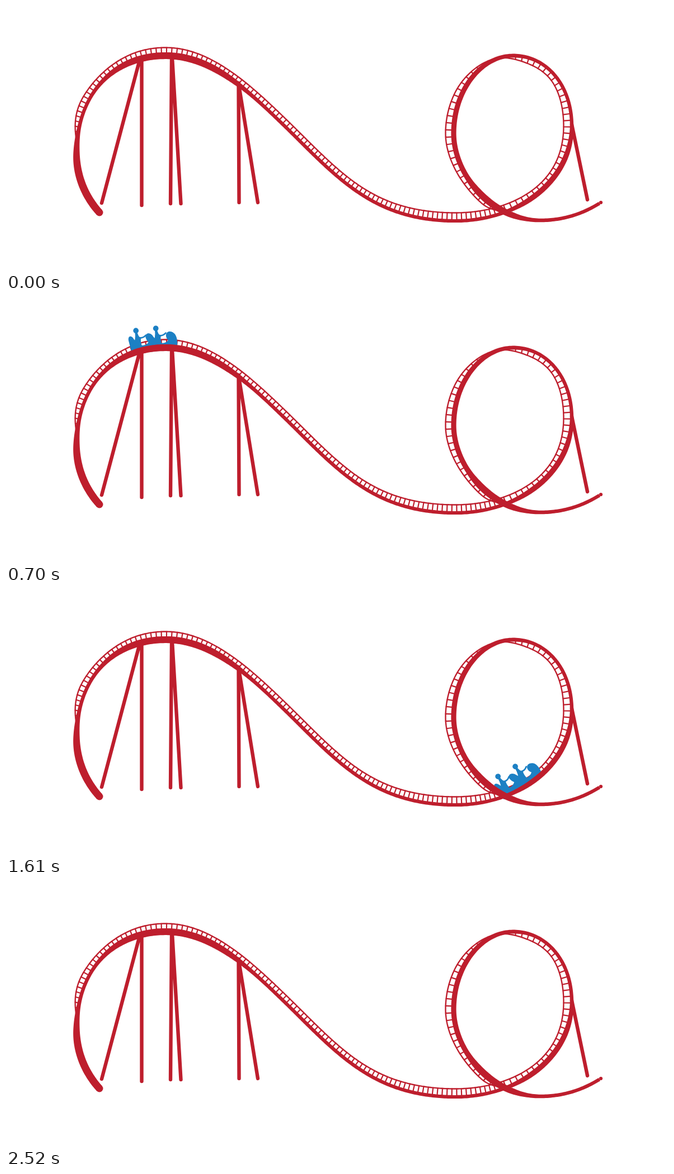
Recreate the animation shown at these times as an HTML page. Size 1183 px wide and 473 px high, loop 2550 ms.

```html
<!DOCTYPE html>
<html lang="en">
<head>
<meta charset="utf-8">
<title>Roller coaster</title>
<style>
html, body { margin: 0; width: 100%; height: 100%; overflow: hidden; background: #fff; }
svg { display: block; width: 1183px; height: 473px; }
.line { fill: none; stroke: #be1e2d; stroke-linecap: round; }
.rail { fill: #be1e2d; }
#cart { fill: #1c80c4; }
.arm { fill: none; stroke: #1c80c4; stroke-width: 2.6; stroke-linecap: round; }
</style>
</head>
<body>
<svg viewBox="0 0 1183 473">
  <defs>
    <path id="ride" d="M167 370C140 340 126 303 126 265C126 160 190 89 285 89
      C370 89 435 154 505 222C595 311 660 385 803 385C920 385 1011 310 1011 215
      C1011 142 966 89 907 89C848 89 800 152 800 228C800 302 868 384 955 384
      C995 384 1030 373 1063 352"/>
    <g id="rider">
      <circle cx="-28.500" cy="-36" r="4.8"/>
      <path d="M-37-10Q-30-20-30.500-34h4Q-26-25-21-22Q-23-17-21-8Z"/>
      <path class="arm" d="M-26-24Q-19-20-12-26"/>
    </g>
  </defs>
  <path class="line" stroke-width="6.4" d="M239 96L171 353M242.500 97V357M296 92L294 354M297 92L312.500 354M415.500 138L416.500 352M415.500 138L450 352M1011 212L1039 347"/>
  <path class="line" id="thin" stroke-width="2.4"/>
  <path class="line" id="rungs" stroke-width="2.2"/>
  <g id="cart">
    <path d="M-40 4L-43-18C-45-27-39-30-35-24C-32-18-30-16-27-14L-21-9Q-14-8-9-13Q-12-17-13-22C-13-30-6-31-1-25C2-19 5-16 8-14L14-9Q21-8 26-13Q22-17 23-23C26-31 35-28 39-22C42-16 42-8 40 0L37 4Z"/>
    <use href="#rider"/>
    <use href="#rider" x="35"/>
  </g>
  <path class="rail" id="thick"/>
  <circle class="rail" cx="167" cy="370" r="6.5"/>
  <circle class="rail" cx="1063" cy="352" r="3.1"/>
</svg>
<script>
const $ = id => document.getElementById(id);
const STEP = 70, LOOP = 2550;
const ride = $('ride'), total = ride.getTotalLength();

// where the thin rail begins, changes sides and ends
const BEGIN = 135, FLIP = 1505, END = 1845;

// time and spot on the ride
const keys = [[70, 145, 338], [490, 168, 142], [560, 207, 109], [980, 372, 110], [1120, 442, 160],
  [1260, 554, 273], [1610, 924, 353], [1960, 821, 146], [2240, 946, 384], [2450, 1027, 371]];

const range = (from, to, step) =>
  Array.from({ length: Math.floor((to - from) / step) + 1 }, (_, i) => from + i * step);
const poly = pts => 'M' + pts.map(p => p[0].toFixed(2) + ' ' + p[1].toFixed(2)).join('L');
const heading = (a, b) => Math.atan2(b.y - a.y, b.x - a.x);
const at = s => ride.getPointAtLength(s);

// point beside the ride, positive to the left of travel
function beside(s, off) {
  const p = at(s), a = heading(at(s - 1), at(s + 1)), d = typeof off === 'function' ? off(s, a) : off;
  return [p.x + d * Math.sin(a), p.y - d * Math.cos(a)];
}

const bump = (s, mid, reach) => Math.exp(-(((s - mid) / reach) ** 4));
const width = s => 6.2 + 7.2 * bump(s, 40, 100) + 6 * bump(s, 400, 130) +
  3.5 * bump(s, 1190, 85) + 3 * bump(s, 1690, 190) + 3.5 * bump(s, 1825, 55);

const ramp = x => Math.sin(Math.max(0, Math.min(1, x)) * Math.PI / 2);
const gap = (s, a) => Math.sign(FLIP - s) * (12.5 + 2 * Math.cos(4 * a)) *
  ramp((s - BEGIN) / 80) * ramp(Math.abs(s - FLIP) / 100) * ramp((END - s) / 40);

function drawTrack() {
  const steps = range(0, total, 3);
  const left = steps.map(s => beside(s, width(s) / 2));
  const right = steps.map(s => beside(s, -width(s) / 2));
  $('thick').setAttribute('d', poly([...left, ...right.reverse()]) + 'Z');
  $('thin').setAttribute('d', poly(range(BEGIN, END, 3).map(s => beside(s, gap))));
  const ties = [...range(BEGIN + 20, 1080, 8.8), ...range(1090, END, 12)];
  $('rungs').setAttribute('d', ties.map(s => poly([beside(s, gap), beside(s, 0)])).join(''));
}

const samples = range(0, total, 1).map(at);
const marks = keys.map(([t, x, y]) => {
  const far = samples.map(p => Math.hypot(p.x - x, p.y - y));
  return [t, far.indexOf(Math.min(...far))];
});
const speed = i => (marks[i + 1][1] - marks[i][1]) / (marks[i + 1][0] - marks[i][0]);
const slopes = marks.map((_, i) => {
  if (!i) return speed(0);
  if (i === marks.length - 1) return .1;
  const a = speed(i - 1), b = speed(i);
  return 2 * a * b / (a + b);
});

// monotone cubic through the marks
function travel(t) {
  let i = 0;
  while (i < marks.length - 2 && t > marks[i + 1][0]) i++;
  const [t0, s0] = marks[i], [t1, s1] = marks[i + 1], h = t1 - t0, f = (t - t0) / h, g = 1 - f;
  return g * g * ((1 + 2 * f) * s0 + f * h * slopes[i]) +
    f * f * ((1 + 2 * g) * s1 - g * h * slopes[i + 1]);
}

function frame(now) {
  const t = Math.floor(Math.max(0, now - start) % LOOP / STEP) * STEP;
  const shown = t >= keys[0][0] && t <= keys[keys.length - 1][0];
  $('cart').style.display = shown ? '' : 'none';
  if (shown) {
    const s = travel(t), a = at(s - 30), b = at(s + 30);
    const turn = heading(a, b) * 180 / Math.PI;
    $('cart').setAttribute('transform',
      `translate(${(a.x + b.x) / 2} ${(a.y + b.y) / 2}) rotate(${turn}) translate(0 -1) scale(1.02)`);
  }
  requestAnimationFrame(frame);
}

drawTrack();
const start = performance.now();
frame(start);
</script>
</body>
</html>
```
